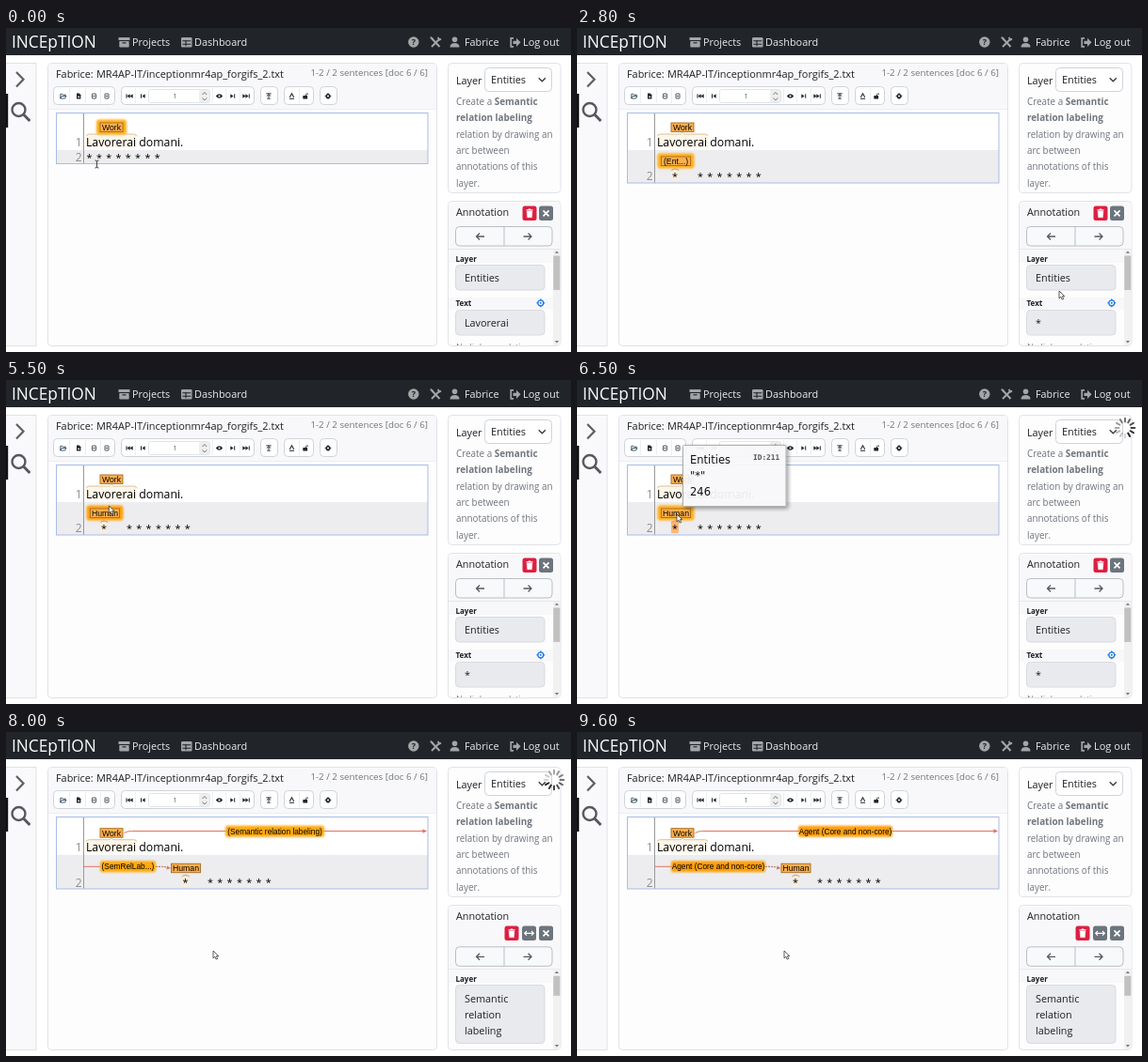
An HTML page for the animation above (9700 ms loop, 600 by 345 pixels).

```html
<!DOCTYPE html>
<html lang="en">
<head>
<meta charset="utf-8">
<title>Annotation editor</title>
<style>
html, body { margin: 0; width: 100%; height: 100%; overflow: hidden; background: #fff; }
svg { display: block; width: 600px; height: 345px; }
text { font-family: "Open Sans", "Noto Sans", sans-serif; white-space: pre; }
.chip { font-family: "Liberation Sans", Arial, sans-serif; font-size: 8.3px; text-anchor: middle; }
.tag { font-size: 8.7px; }
.pop { font-family: "DejaVu Sans", Verdana, sans-serif; }
.mono { font-family: "DejaVu Sans Mono", monospace; font-weight: bold; }
</style>
</head>
<body>
<svg id="stage" viewBox="0 0 600 345" xmlns="http://www.w3.org/2000/svg">
  <defs>
    <filter id="blur" x="-30%" y="-80%" width="160%" height="260%"><feGaussianBlur stdDeviation="1.3"/></filter>
    <filter id="shade" x="-10%" y="-10%" width="130%" height="130%"><feDropShadow dx="2" dy="2" stdDeviation="2" flood-opacity=".4"/></filter>
    <clipPath id="panel"><rect x="470" y="236" width="111" height="102"/></clipPath>
  </defs>
  <g id="base"></g>
  <g id="doc"></g>
  <g id="side"></g>
  <g id="popup"></g>
  <g id="spin"></g>
  <g id="cursor"></g>
</svg>
<script>
const LOOP = 9700;
const $ = id => document.getElementById(id);
const text = (x, y, s, size = 10.8, fill = '#1c2024', more = '') =>
  `<text x="${x}" y="${y}" font-size="${size}" fill="${fill}" ${more}>${s}</text>`;
const rect = (x, y, w, h, fill, stroke = 'none', r = 0, more = '') =>
  `<rect x="${x}" y="${y}" width="${w}" height="${h}" rx="${r}" fill="${fill}" stroke="${stroke}" ${more}/>`;
const path = (d, stroke, w = 1, fill = 'none', more = '') =>
  `<path d="${d}" stroke="${stroke}" stroke-width="${w}" fill="${fill}" ${more}/>`;
const circle = (x, y, r, fill, stroke = 'none', w = 1) =>
  `<circle cx="${x}" cy="${y}" r="${r}" fill="${fill}" stroke="${stroke}" stroke-width="${w}"/>`;
const at = (x, y, s) => `<g transform="translate(${x} ${y})">${s}</g>`;

function header() {
  const c = '#a3a5a7', light = '#ebecec';
  return rect(0, 0, 600, 29, '#212529') +
    text(6, 21, 'INCEpTION', 17.3, '#fff') +
    rect(119.5, 10, 12, 3, c, 'none', .6) + rect(120.3, 14, 10.4, 6.5, c, 'none', .8) +
    rect(123.5, 15.2, 4, 1.2, '#212529') +
    text(134, 19, 'Projects', 10.8, light) +
    rect(186, 10, 11.5, 10.5, c, 'none', 1.2) +
    path('M187.3 13.8h9M187.3 17.2h9M191 13v6.2', '#212529', 1.1) +
    text(200, 19, 'Dashboard', 10.9, light) +
    circle(432.8, 15, 5.7, c) + text(432.8, 18.4, '?', 9, '#212529', 'font-weight="bold" text-anchor="middle"') +
    path('M452 20L460.5 11.5M452 11L460.5 20', c, 2) + path('M450.7 9.8l3 2.5M458.5 10l2 2.6 1.5-1', c, 1.8) +
    circle(476.5, 12.2, 2.8, c) + path('M471.5 20.5q0-4.5 5-4.5t5 4.5z', c, 0, c) +
    text(487, 19, 'Fabrice', 10.8, light) +
    path('M539 10.8h-2.8v9h2.8', c, 1.7) + path('M538.5 13.7h3.5v-3l4.5 4.6-4.5 4.6v-3h-3.5z', c, 0, c) +
    text(549, 19, 'Log out', 11, light);
}

function toolbar() {
  const k = '#212529';
  const group = (x, w) => rect(x, 62.5, w, 19, '#fff', '#ced4da', 4);
  const bar = x => rect(x, 70.3, 1, 4.4, k);
  const left = x => path(`M${x + 1.7} 70.2v4.6l-3.2-2.3z`, k, 0, k);
  const right = x => path(`M${x - 1.7} 70.2v4.6l3.2-2.3z`, k, 0, k);
  const note = x => rect(x - 2, 70, 4, 5, 'none', k, .5, 'stroke-width=".8"') + circle(x, 72.5, .8, k);
  let s = group(50.5, 65) + group(122.5, 141) + group(270.5, 18) + group(295.5, 31) + group(333.5, 18);
  s += path('M67.5 64v16M84.5 64v16M100.5 64v16M137.5 64v16M219.5 64v16M233.5 64v16M248.5 64v16M311.5 64v16', '#eceef0');
  s += path('M57.8 75v-4.7h2l.8.8h2.6v1.4M57.8 75l1.3-2.5h4.8l-1.3 2.5z', '#2c4a63', .9);
  s += path('M75 69.5h2.7l1.7 1.7v4.3h-4.4z', k, 0, k) + rect(76.3, 72.7, 1.8, 1.4, '#fff') + note(93.5) + note(107);
  s += bar(127.5) + left(130) + left(133) + bar(143) + left(146);
  s += rect(151.5, 65.5, 65, 14, '#fff', '#e2e5e8', 2) + text(179.5, 75, '1', 7, '#495057', 'text-anchor="middle"');
  s += rect(205, 66, 11, 13, '#eee') + path('M208.5 71l2.3-2.5 2.3 2.5M208.5 74.5l2.3 2.5 2.3-2.5', '#777', 1);
  s += path('M222.8 72.5q3.7-4.6 7.4 0q-3.7 4.6-7.4 0z', k, 0, k) + circle(226.5, 72.5, 1, '#fff');
  s += right(240) + bar(242.2) + right(253) + right(256) + bar(257.8);
  s += path('M276.3 69.8h5.4M279 70.3v4.6M277.3 75.2h3.4M276.8 72.5l2.2-1.8 2.2 1.8', k, .9);
  s += path('M301.3 73.8l2.2-4 2.2 4M301 75.2h5', k, 1.1) +
    rect(315.3, 72, 4.8, 3.6, k, 'none', .5) + path('M318.5 72v-1.3q1.4-1.8 2.5 0', k, .9);
  s += circle(342, 72.5, 1.8, 'none', k, 1.6) + path('M342 69.2v1M342 74.8v1M338.7 72.5h1M344.3 72.5h1', k, 1.2);
  return s;
}

function base() {
  const line = '#e1e2e7', grey = '#6f757c';
  const para = ['relation by drawing an', 'arc between', 'annotations of this', 'layer.'];
  return rect(0, 0, 600, 345, '#fff') + header() +
    rect(-2, 37.5, 34, 301, '#f9f8fb', line) +
    path('M11 47l7.5 7.7-7.5 7.7', '#5b6065', 2.2) +
    rect(0, 70, 2.2, 36, '#111') +
    circle(13.5, 87, 7, 'none', '#55595e', 2.4) + path('M18.8 92.3l6.5 6.7', '#55595e', 3) +
    rect(44.5, 37.5, 413, 301, '#fdfdfe', line, 4) +
    path('M45 86.5V41q0-3 3-3h406q3 0 3 3v45.5z', 'none', 0, '#f8f8fa') + path('M45 86.5h412', '#eceef0') +
    text(53, 52.5, 'Fabrice:', 10.9) + text(96, 52.5, 'MR4AP-IT/inceptionmr4ap_forgifs_2.txt', 10.95) +
    text(448, 51.3, '1-2 / 2 sentences [doc 6 / 6]', 9.75, grey, 'text-anchor="end"') +
    toolbar() +
    rect(469.5, 37.5, 119.5, 138, '#fdfdfe', line, 4) +
    text(478, 60, 'Layer') + rect(508.5, 42.5, 71, 25, '#fff', '#ced4da', 4) +
    text(515, 59, 'Entities') + path('M565.7 53.2l3.6 3.6 3.6-3.6', '#343a40', 1.3) +
    text(478, 82, 'Create a <tspan font-weight="bold">Semantic</tspan>', 9.9, grey) +
    text(478, 99.3, 'relation labeling', 9.9, grey, 'font-weight="bold"') +
    para.map((p, i) => text(478, 116.6 + 17.3 * i, p, 9.9, grey)).join('') +
    rect(469.5, 184.5, 119.5, 154, '#fdfdfe', line, 4) + rect(470, 186, 118.5, 49, '#f8f8fa') +
    text(478, 200, 'Annotation');
}

function button(x, y, kind) {
  const s = rect(0, 0, 15, 15.5, kind === 'bin' ? '#dc1f42' : '#6c757d', 'none', 2.5);
  const mark = {
    bin: path('M4 4.4h7M6.3 3.5h2.4', '#fff', 1.1) + path('M4.6 5.6h5.8l-.5 6.6h-4.8z', '#fff', .4, '#fff'),
    x: path('M4.5 4.8l6 6M10.5 4.8l-6 6', '#fff', 1.7),
    span: path('M3 7.8h9M5 5.5l-2.3 2.3 2.3 2.3M10 5.5l2.3 2.3-2.3 2.3', '#fff', 1.2)
  }[kind];
  return at(x, y, s + mark);
}

function side(value) {
  const dy = value ? 0 : 17.3, ink = '#1c2024', box = '#e9eaee', edge = '#d7dae0';
  let s = value ? button(548.5, 189.5, 'bin') + button(566, 189.5, 'x')
    : rect(470, 234, 118.5, 18.5, '#f8f8fa') +
      button(529.5, 206.5, 'bin') + button(548, 206.5, 'span') + button(566, 206.5, 'x');
  s += at(0, dy, rect(477.5, 211.5, 102.5, 20.5, '#f8f9fa', '#b9bec4', 4) + path('M529 211.5v20.5', '#b9bec4') +
    path('M508 222h-8.5M503 218.5l-3.5 3.5 3.5 3.5M549.5 222h8.5M554.5 218.5l3.5 3.5-3.5 3.5', '#555b61', 1.3));
  s += path(`M470 ${235.5 + dy}h118.5`, '#e4e6e9') + rect(581, 236 + dy, 7.5, 102 - dy, '#f1f1f1');
  s += path(`M582.7 ${239.8 + dy}l2.2-2.4 2.2 2.4zM582.7 333l2.2 2.4 2.2-2.4z`, 'none', 0, '#777');
  s += rect(581.3, 242.5 + dy, 7, value ? 36.5 : 21, '#c1c1c1');
  let body = rect(470, 236 + dy, 111, 14, '#f8f8fa') + text(477.5, 248.5 + dy, 'Layer', 8, ink, 'font-weight="bold"');
  if (value) {
    body += rect(477.5, 252.5, 94.5, 26.5, box, edge, 4) + text(487, 270.3, 'Entities') +
      rect(470, 287, 111, 12.5, '#f8f8fa') + text(477.5, 296, 'Text', 8, ink, 'font-weight="bold"') +
      circle(567.8, 292.8, 3, 'none', '#1676e8', 1.2) + circle(567.8, 292.8, 1, '#1676e8') +
      path('M567.8 288.3v2M567.8 295.3v2M563.3 292.8h2M570.3 292.8h2', '#1676e8', 1) +
      rect(477.5, 300.5, 94.5, 26.5, box, edge, 4) + text(487, 318.3, value) +
      text(478, 342.5, 'No links or relations', 9, '#7a8087');
  } else {
    body += rect(477.5, 269.5, 94.5, 62, box, edge, 4) +
      ['Semantic', 'relation', 'labeling'].map((w, i) => text(487, 287.5 + 17.3 * i, w)).join('');
  }
  return s + `<g clip-path="url(#panel)">${body}</g>`;
}

const chip = (x, y, w, label, lit) =>
  (lit ? rect(x - 3.5, y - 3, w + 7, 16, '#fa0', 'none', 3, 'class="glow" filter="url(#blur)"') : '') +
  rect(x + .5, y + .5, w - 1, 9.5, '#fcb04e', '#a8681c', 0, 'stroke-width=".9"') +
  `<text class="chip tag" x="${x + w / 2}" y="${y + 8.4}">${label}</text>`;

const arcLabel = (x, y, w, label) =>
  rect(x, y - 6, w, 12, '#fa0', 'none', 2, 'class="glow" filter="url(#blur)"') +
  `<text class="chip" x="${x + w / 2}" y="${y + 3}">${label}</text>`;

// Each scene gives the second row's layout and labels.
const scenes = {
  work: { bottom: 144.5, y1: 125.7, y2: 141.5, first: 88.5, rest: 98.9 },
  ent: { bottom: 165, y1: 125.7, y2: 162, first: 104, rest: 131, tag: '(Ent...)', tagX: 89 },
  human: { bottom: 165, y1: 125.7, y2: 162, first: 104, rest: 131, tag: 'Human', tagX: 89 },
  sem: { bottom: 167, y1: 127.4, y2: 164.3, first: 190.5, rest: 217, tag: 'Human', tagX: 175,
    arc: ['(Semantic relation labeling)', 233, 105, '(SemRelLab...)', 59] },
  agent: { bottom: 167, y1: 127.4, y2: 164.3, first: 232, rest: 258, tag: 'Human', tagX: 216.5,
    arc: ['Agent (Core and non-core)', 235, 100, 'Agent (Core and non-core)', 100] }
};

function doc(name, hover) {
  const c = scenes[name], num = '#8d8d8d', off = c.y1 - 125.7, red = '#dd7464';
  const star = x => text(x, c.y2, '*', 10.8, '#000', 'text-anchor="middle"');
  let s = rect(53, 91, 395, c.bottom - 91, '#fff') + rect(53, 130 + off / 2, 395, c.bottom - 130 - off / 2, '#ededef') +
    path(`M82.5 91V${c.bottom}`, '#999') +
    rect(53.5, 90.5, 394.5, c.bottom - 90.5, 'none', '#a9bde6') +
    text(80.5, c.y1, '1', 12, num, 'text-anchor="end"') + text(80.5, c.y2 + .3, '2', 12, num, 'text-anchor="end"');
  s += rect(85, 113 + off, 54, 14, '#fdf6ea') +
    path(`M85.5 ${115 + off}q0-2 3-2h20q3 0 3.500-1.500q.5 1.500 3.500 1.500h20q3 0 3 2`, '#d9b27c', .8);
  if (c.tag) {
    s += rect(c.first - 4, c.y2 - 11, 8, 12, hover ? '#ffb67a' : '#f7ede2') +
      path(`M${c.first - 3.5} ${c.y2 - 10}q0-1.500 2-1.500t1.500-1q0 1 2 1t2 1.500`, '#b08f62', .8);
  }
  s += text(85, c.y1, 'Lavorerai domani.', 12.28, '#000') + star(c.first);
  for (let i = 0; i < 7; i++) s += star(c.rest + 10.3 * i);
  if (c.arc) {
    const [top, x, w, low, lw] = c.arc, end = c.tagX;
    s += path('M125.5 107.5q3-2 8-2H446', red) + path('M442.5 103.2l4.5 2.3-4.5 2.3z', red, 0, red) +
      path('M83 143.3H101', red) +
      path(`M${100 + lw} 143.3h5q6 0 ${end - 108 - lw} 1.7`, '#a9604a', 1, 'none', 'stroke-dasharray="2 1"') +
      path(`M${end - 4} 142.5l4 2.5-4.500 1.500z`, red, 0, red) +
      arcLabel(x, 105.7, w, top) + arcLabel(100, 143.3, lw, low);
  }
  s += chip(99.5, 100.5 + off, 25, 'Work', name === 'work');
  if (c.tag) s += chip(c.tagX, c.arc ? 139.7 : 136.5, 32, c.tag, !c.arc);
  return s;
}

const popup = rect(112.5, 69.5, 109.5, 65, '#f8f8fb', '#aaa', 1, 'opacity=".94" filter="url(#shade)"') +
  text(120, 89, 'Entities', 11.5, '#111', 'class="pop"') + text(120, 106, '"*"', 11.5, '#111', 'class="pop"') +
  text(120, 123, '246', 11.5, '#111', 'class="pop"') + text(187, 85, 'ID:211', 7.8, '#555', 'class="mono"');

const arrow = path('M0 0V7.8l1.9-1.6 1.3 2.9 1.5-.7-1.3-2.8h2.4z', '#333', .8, '#fff');
const beam = path('M-2-4q2 0 2 1q0-1 2-1M0-3V3M-2 4q2 0 2-1q0 1 2 1', '#333', .9);

// Cursor stops: time, x, y
const stops = [[0, 96.5, 145], [300, 96.5, 145], [800, 90, 138], [1200, 90, 138], [1600, 369, 269], [2200, 512, 280],
  [4050, 512, 280], [4500, 119, 108], [5100, 119, 108], [5700, 106, 143], [6900, 106, 143], [7600, 220, 233], [LOOP, 220, 233]];
const ease = u => u * u * (3 - 2 * u);
function pointer(t) {
  const i = stops.findIndex((s, n) => n && t <= s[0]);
  const [a, x, y] = stops[i - 1], [b, X, Y] = stops[i], u = ease((t - a) / (b - a));
  return [x + (X - x) * u, y + (Y - y) * u];
}

const last = list => t => list.filter(e => e[0] <= t).pop()[1];
const sceneAt = last([[0, 'work'], [1200, 'ent'], [4000, 'human'], [6700, 'sem'], [8300, 'agent']]);
const pulseStart = last([[0, -400], [1200, 1200], [3000, 3600], [6100, 6100], [6700, 7700]]);
const busy = [[1100, 1400], [3800, 4200], [6400, 7150], [7800, 8350]];

function glow(t) {
  const p = ((t - pulseStart(t)) % 2000 + 2000) % 2000 / 1000;
  const k = p < 1 ? p : 2 - p;
  return `rgb(255,${Math.round(155 + 45 * k)},${Math.round(8 + 62 * k * k)})`;
}

function spinner(t) {
  const turn = Math.floor(t / 100);
  let s = '';
  for (let i = 0; i < 12; i++) {
    const shade = (turn - i + 144) % 12;
    s += `<path d="M0-6.5V-10.3" stroke="#222" stroke-width="2" stroke-linecap="round" opacity="${(1 - shade * .075).toFixed(2)}" transform="rotate(${i * 30})"/>`;
  }
  return at(582, 51, s);
}

const shown = {};
function put(id, key, make) {
  if (shown[id] === key) return;
  shown[id] = key;
  $(id).innerHTML = make();
}

function draw(t) {
  const scene = sceneAt(t), hover = t >= 5900 && t < 6700;
  const value = scene === 'work' ? 'Lavorerai' : scenes[scene].arc ? '' : '*';
  put('doc', scene + hover, () => doc(scene, hover));
  put('side', 'v' + value, () => side(value));
  put('popup', hover, () => hover ? popup : '');
  const on = busy.some(([a, b]) => t >= a && t < b);
  put('spin', on ? Math.floor(t / 100) : -1, () => on ? spinner(t) : '');
  put('cursor', t < 1200, () => t < 1200 ? beam : arrow);
  const color = glow(t);
  document.querySelectorAll('.glow').forEach(g => g.setAttribute('fill', color));
  $('cursor').setAttribute('transform', `translate(${pointer(t).map(v => v.toFixed(2)).join(' ')})`);
}

$('base').innerHTML = base();
const start = performance.now();
function tick() {
  draw((performance.now() - start) % LOOP);
  requestAnimationFrame(tick);
}
tick();
</script>
</body>
</html>
```
